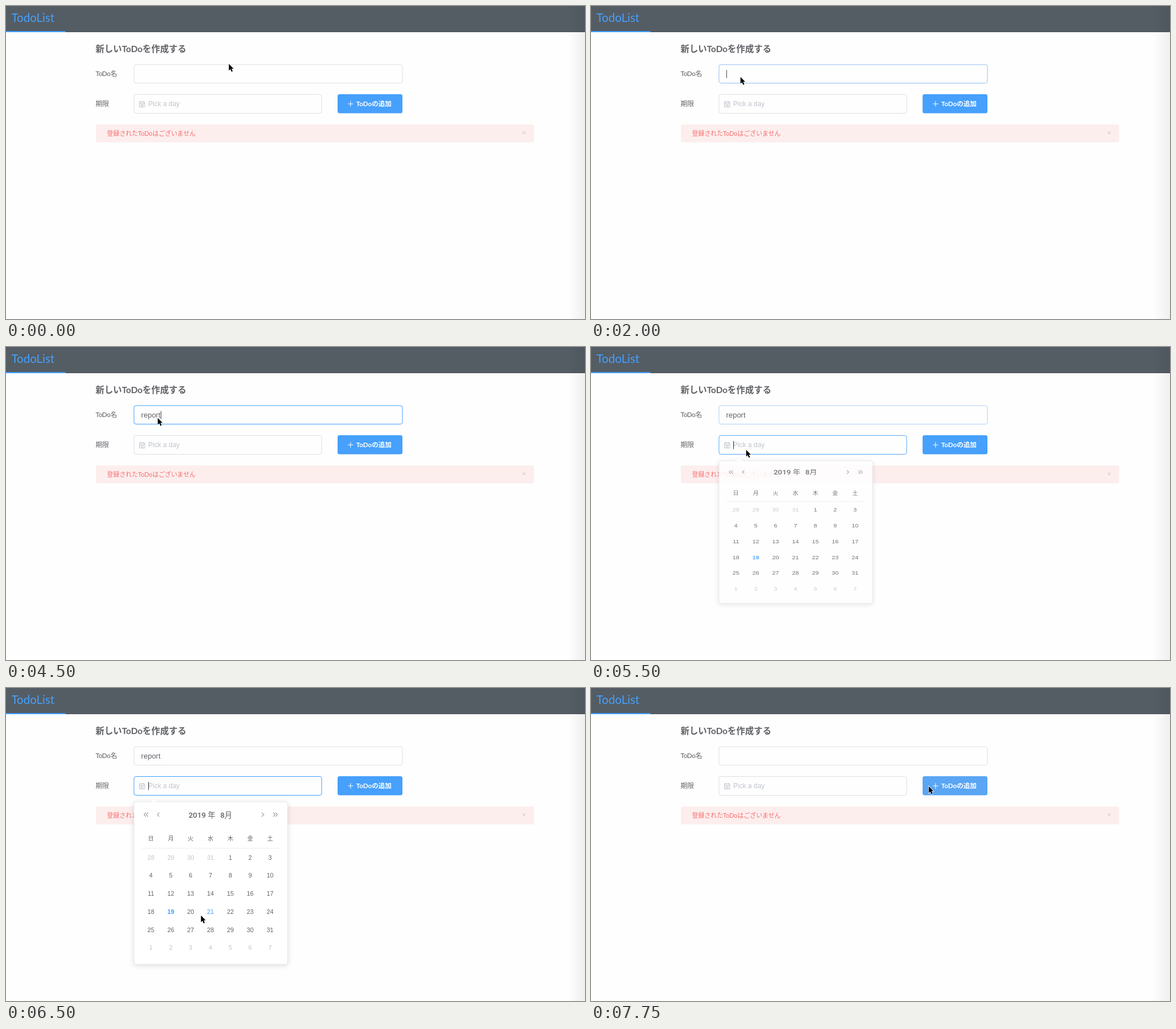
These frames come from a looping animation (1018 px wide and 550 px high, 8 s). An HTML page:

```html
<!DOCTYPE html>
<html lang="ja">
<head>
<meta charset="utf-8">
<title>TodoList</title>
<style>
  html, body { margin: 0; width: 100%; height: 100%; overflow: hidden; background: #fefefe; }
  svg { display: block; width: 1018px; height: 550px; }
  text { fill: #606266; font-family: Lato, "Noto Sans CJK JP", "Noto Sans CJK", sans-serif; white-space: pre; }
  .plain { font-family: "Liberation Sans", "Noto Sans CJK JP", sans-serif; }
  .day { font-size: 10.8px; text-anchor: middle; }
  .week { font-size: 10px; text-anchor: middle; }
  .month { font: 500 13.4px Roboto, "Noto Sans CJK JP", "Noto Sans CJK", sans-serif; }
  .box { fill: #fefefe; stroke: #dcdfe6; }
  .caret { stroke: #444; }
  .line { fill: none; }
  #panel { filter: drop-shadow(0 2px 5px rgba(0, 0, 0, .12)); }
</style>
</head>
<body>
<svg viewBox="0 0 1018 550">
  <defs>
    <linearGradient id="edge">
      <stop offset="0" stop-opacity="0"/>
      <stop offset="1" stop-opacity=".06"/>
    </linearGradient>
  </defs>
  <rect width="1018" height="550" fill="#fefefe"/>
  <rect width="1018" height="46" fill="#545c64"/>
  <rect y="45" width="1018" height="1" fill="#51535b"/>
  <rect y="44" width="104.5" height="2" fill="#409eff"/>
  <text x="9.5" y="27.7" font-size="20.5" style="fill:#46a0fc">TodoList</text>

  <text x="157.5" y="81" font-size="15.4" font-weight="700">新しいToDoを作成する</text>
  <text x="157.5" y="123" font-size="11.7" letter-spacing="-.3">ToDo名</text>
  <text x="157.5" y="175.7" font-size="11.8" font-weight="500">期限</text>

  <rect id="nameBox" class="box" x="225" y="103" width="472" height="32.5" rx="3.5"/>
  <text id="name" class="plain" x="237.6" y="123.5" font-size="13"></text>
  <path id="nameCaret" class="caret" d="M.5 112.5v14"/>

  <rect id="dateBox" class="box" x="225" y="155.5" width="330" height="33" rx="3.5"/>
  <path class="line" stroke="#c0c4cc" d="M234.5 168.5h9.5v9h-9.5zM234.5 171.5h9.5M237 167v3M241.5 167v3M236.5 173.5h5.5M236.5 175.5h5.5"/>
  <text id="date" class="plain" x="250" y="176.3"></text>
  <path id="dateCaret" class="caret" d="M250.5 165v14.5"/>

  <rect id="button" x="583" y="155" width="114" height="33.5" rx="3.5"/>
  <path class="line" stroke="#fff" d="M601 172h9.5M605.75 167.2v9.6"/>
  <text x="615.7" y="176.2" font-size="11.6" font-weight="700" style="fill:#fff">ToDoの追加</text>

  <rect x="158" y="208" width="770.5" height="31.5" rx="3.5" fill="#fdeeee"/>
  <text x="177.6" y="227.8" font-size="10.9" style="fill:#f56c6c">登録されたToDoはございません</text>
  <path class="line" stroke="#c0c4cc" d="M908.3 220l5.6 5.6m0-5.6l-5.6 5.6"/>

  <g id="popup">
    <g id="panel">
      <rect x="225" y="200" width="270" height="285.5" rx="3.5" fill="#fff" stroke="#e4e7ed"/>
      <path d="M254 200.6l5.8-5.8 5.8 5.8z" fill="#fff"/>
    </g>
    <path class="line" stroke="#606266" d="M245.8 219l-3 3.5 3 3.5M249.6 219l-3 3.5 3 3.5M269.5 219l-3.4 3.5 3.4 3.5M449.8 219l3.4 3.5-3.4 3.5M470.2 219l3 3.5-3 3.5M474 219l3 3.5-3 3.5"/>
    <text class="month" x="321" y="227.6">2019 年</text>
    <text class="month" x="376.7" y="227.6">8月</text>
    <path stroke="#ebeef5" d="M239 281.5h242"/>
    <g id="days"></g>
  </g>

  <rect x="988" width="30" height="550" fill="url(#edge)"/>
  <path id="cursor" d="M.8 .8V12.6l2.7-2.5 2 4.5 2.1-.9-2-4.4h3.6z" stroke="#fff" stroke-width="1.4" paint-order="stroke"/>
</svg>
<script>
const LOOP = 8000;
const BLUE = '#409eff', GREY = '#dcdfe6';
const $ = id => document.getElementById(id);
const ui = {};
for (const id of ['nameBox', 'name', 'nameCaret', 'dateBox', 'date', 'dateCaret', 'button', 'popup', 'days', 'cursor'])
  ui[id] = $(id);

function addText(cls, x, y, str, color) {
  const el = document.createElementNS('http://www.w3.org/2000/svg', 'text');
  el.setAttribute('class', cls);
  el.setAttribute('x', x);
  el.setAttribute('y', y);
  el.textContent = str;
  if (color) el.style.fill = color;
  ui.days.append(el);
  return el;
}

// Calendar: 6 weeks starting on 28 July
const colX = c => 254.8 + c * 34.9;
[...'日月火水木金土'].forEach((w, c) => addText('week', colX(c), 267.9, w));
let pick;
for (let i = 0; i < 42; i++) {
  const n = i - 3;
  const inMonth = n >= 1 && n <= 31;
  const label = n < 1 ? n + 31 : inMonth ? n : n - 31;
  const el = addText('day plain', colX(i % 7), 301.6 + Math.floor(i / 7) * 31.75, label,
    inMonth ? (n === 19 ? BLUE : '') : '#c0c4cc');
  if (n === 19) el.style.fontWeight = 700;
  if (n === 21) pick = el;
}

const start = {
  at: [391, 101], name: '', nameCaret: 0, nameBox: GREY,
  date: '', dateCaret: 0, dateBox: GREY,
  open: 0, hover: 0, button: '#46a0fc'
};

// Each step changes only the listed values
const steps = [
  [0, {}],
  [250, { at: [313, 124] }],
  [500, { at: [280, 124] }],
  [750, { at: [279, 124] }],
  [1750, { at: [264, 124] }],
  [2000, { at: [262, 124], nameCaret: 1, nameBox: '#94c0ee' }],
  [2250, { at: [266, 124], nameBox: BLUE }],
  [2500, { nameCaret: 0 }],
  [2750, { name: 'r', nameCaret: 1 }],
  [3000, { name: 're' }],
  [3500, { name: 'rep' }],
  [4000, { name: 'repor' }],
  [4500, { name: 'report' }],
  [5000, { at: [267, 187], nameCaret: 0, dateBox: '#c0c4cc' }],
  [5250, { at: [272, 180] }],
  [5500, { nameBox: '#b0cff2', dateBox: '#58a6f8', dateCaret: 1, open: .877 }],
  [5750, { nameBox: GREY, dateBox: BLUE, open: 1 }],
  [6000, { at: [352, 382], dateCaret: 0, hover: 1 }],
  [6250, { at: [347, 393] }],
  [6500, { at: [342, 399], dateCaret: 1 }],
  [6750, { date: '2019-08-21', dateCaret: 0, dateBox: GREY, open: .1 }],
  [7000, { at: [549, 189], open: 0 }],
  [7250, { at: [579, 166] }],
  [7500, { at: [593, 172], button: '#3a8ee6' }],
  [7750, { name: '', date: '', button: '#5aa5f4' }]
];

let state = start;
const scenes = steps.map(([time, change]) => ({ time, ...(state = { ...state, ...change }) }));

function draw(s) {
  ui.cursor.setAttribute('transform', `translate(${s.at})`);
  ui.name.textContent = s.name;
  const end = s.name ? ui.name.getComputedTextLength() : 0;
  ui.nameCaret.setAttribute('transform', `translate(${Math.round(237.6 + end)})`);
  ui.nameCaret.style.opacity = s.nameCaret;
  ui.nameBox.style.stroke = s.nameBox;
  ui.date.textContent = s.date || 'Pick a day';
  ui.date.style.fill = s.date ? '#606266' : '#c0c4cc';
  ui.date.style.fontSize = s.date ? '12.7px' : '12px';
  ui.dateCaret.style.opacity = s.dateCaret;
  ui.dateBox.style.stroke = s.dateBox;
  ui.button.style.fill = s.button;
  ui.popup.style.display = s.open ? '' : 'none';
  ui.popup.style.opacity = s.open;
  ui.popup.setAttribute('transform', `translate(0 200) scale(1 ${s.open || 1}) translate(0 -200)`);
  pick.style.fill = s.hover ? BLUE : '';
}

const t0 = performance.now();
let shown;
function tick() {
  const t = (performance.now() - t0) % LOOP;
  const scene = scenes.filter(s => s.time <= t).pop();
  if (scene !== shown) draw(shown = scene);
  requestAnimationFrame(tick);
}
tick();
</script>
</body>
</html>
```
